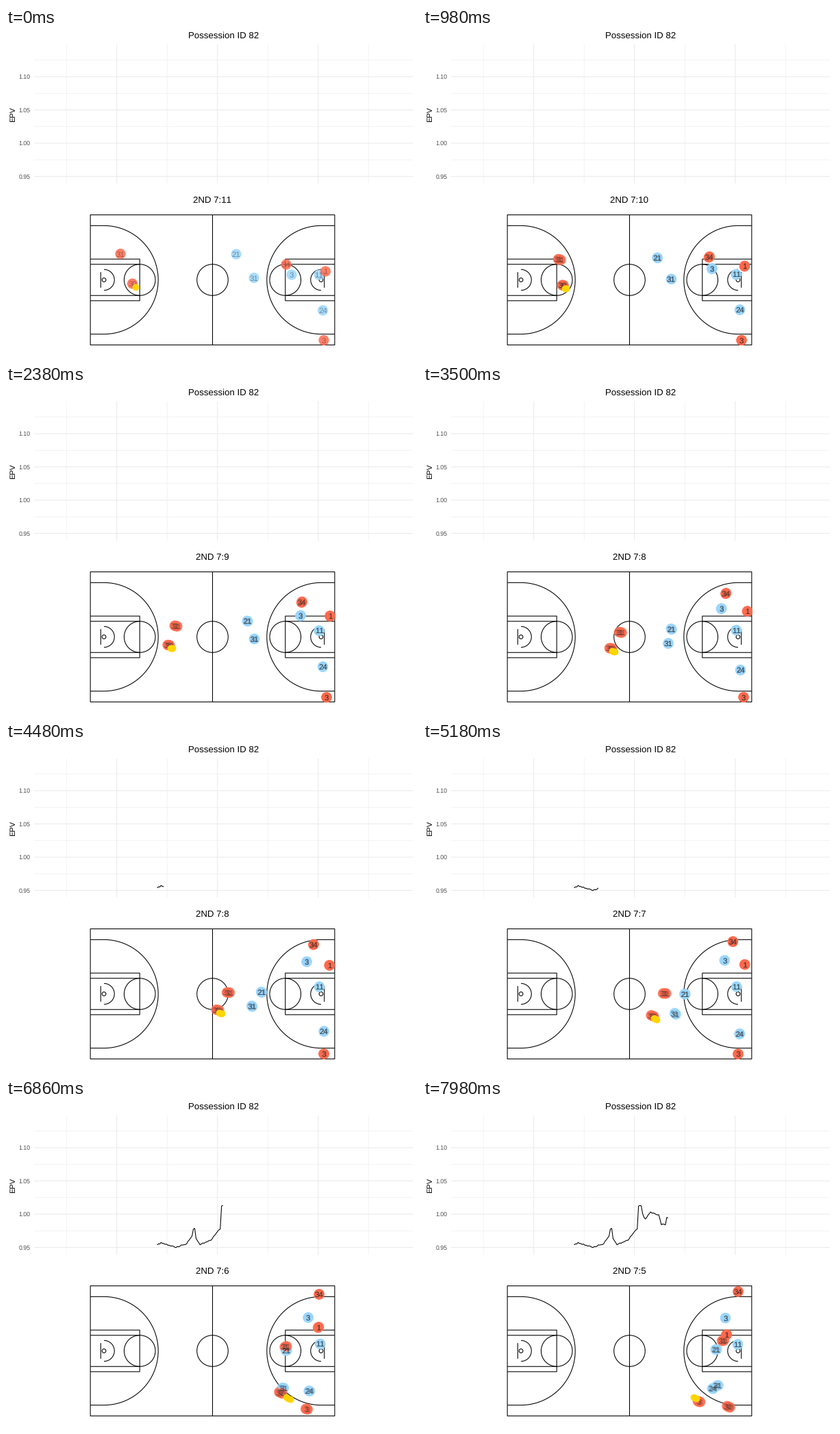
A matplotlib script for the animation above (8000 ms loop, 600 by 480 pixels).

```python
import numpy as np
import matplotlib.pyplot as plt
from matplotlib.animation import FuncAnimation

plt.rcParams.update({
    "font.family": ["Liberation Sans", "DejaVu Sans"],
    "path.snap": False,
    "text.hinting": "none",
    "text.kerning_factor": 6,
})

W, H, DPI = 600, 480, 100
PT = 72 / DPI            # points per pixel
LOOP, TICK, STEP = 8000, 40, 140
RATE = 2.605             # tracking samples per step
TRAIL = 3                # samples drawn together
EPV_START = 78           # sample at which the curve begins

fig = plt.figure(figsize=(W / DPI, H / DPI), dpi=DPI, facecolor="white")
ax = fig.add_axes([0, 0, 1, 1])
ax.set(xlim=(0, W), ylim=(H, 0))
ax.axis("off")


def line(xs, ys, color="black", width=1.07, z=2):
    return ax.plot(xs, ys, color=color, lw=width * PT, zorder=z,
                   solid_capstyle="butt", solid_joinstyle="round")[0]


def label(x, y, s, size, color="black", ha="center", **kw):
    return ax.text(x, y, s, fontsize=size * PT, color=color, ha=ha,
                   va="baseline", rotation_mode="anchor", **kw)


def smooth(u):
    u = np.clip(u, 0, 1)
    return u * u * (3 - 2 * u)


# ---- chart panel
X0, DX = 161.7, 147
Y0, DY = 216.5, 48.5

for n in range(-1, 6):
    width = 0.55 if n % 2 else 1.07
    x = X0 + n * DX / 2
    line([x, x], [24, 227], "#ebebeb", width, 1)
for n in range(8):
    width = 0.55 if n % 2 else 1.07
    y = Y0 - n * DY / 2
    line([41, 594], [y, y], "#ebebeb", width, 1)
    if n % 2 == 0:
        label(35.5, y + 3.2, f"{0.95 + n * 0.025:.2f}", 8.8, "#4d4d4d", "right")
label(317.5, 15, "Possession ID 82", 13.2)
label(13, 125.5, "EPV", 11, rotation=90)
clock = label(301.3, 255, "", 13.2)

# main turns of the curve (sample, height), with a little noise between
turns = np.array([
    (0, 212), (3, 210), (14, 216), (22, 211), (26, 200), (27, 189), (28, 189),
    (29, 204), (32, 212), (40, 206), (47, 189), (48, 155.5), (50, 155.5),
    (51, 168), (53, 175), (57, 165), (63, 169), (65, 183), (68, 183),
    (69, 172), (70, 174)])
epv_i = np.arange(turns[-1, 0] + 1)
epv_x = 220.6 + epv_i * DX / 75
epv_y = np.interp(epv_i, *turns.T)
epv_y += np.random.default_rng(4).uniform(-0.9, 0.9, len(epv_i))
epv = line([], [], z=3)

# ---- court, in feet from its centre
FT, MX, MY = 3.795, 301.5, 367.5
HOOP = 41.75


def court(xs, ys):
    """Draw on the left half and mirror to the right."""
    for side in (-1, 1):
        line(MX + side * FT * np.asarray(xs), MY + FT * np.asarray(ys))


def arc(cx, r, half=180):
    a = np.radians(np.linspace(-half, half, 90))
    return cx - r * np.cos(a), r * np.sin(a)


def bow(r):
    """Half circle around the hoop, open to the baseline."""
    x, y = arc(0, r, 90)
    return HOOP + x, y


court([0, 47, 47, 0], [-25, -25, 25, 25])
line([MX, MX], [MY - 25 * FT, MY + 25 * FT])
line(MX + FT * arc(0, 6)[0], MY + FT * arc(0, 6)[1])
bx, by = bow(20.85)
court([47, *bx, 47], [by[0], *by, by[-1]])
court([47, 28, 28, 47], [-8, -8, 8, 8])
for y in (-6, 6):
    court([47, 28], [y, y])
court(*arc(28, 6))
court(*bow(4))
court(*arc(HOOP, 0.75))
court([43, 43], [-3, 3])


# ---- players: waypoints (sample, x, y)
def route(*stops):
    """Smooth cubic path through the waypoints."""
    a = np.array(stops, float)
    t, p = a[:, 0], a[:, 1:]
    v = np.gradient(p, t, axis=0)

    def at(s):
        i = np.clip(np.searchsorted(t, s, "right") - 1, 0, len(t) - 2)
        h = t[i + 1] - t[i]
        u = (s - t[i]) / h
        w = u * u * (3 - 2 * u)
        return (p[i] * (1 - w) + p[i + 1] * w
                + h * u * (1 - u) * (v[i] * (1 - u) - v[i + 1] * u))
    return at


blue = {
    "21": route((0, 336, 330), (43, 352.5, 344.5), (82, 373, 365), (147, 428, 365.5)),
    "31": route((0, 362, 364.5), (43, 362.5, 370.5), (82, 359, 385.5),
                (126, 404.5, 421.5), (147, 430, 418)),
    "3": route((0, 417, 360), (82, 439, 320.5), (147, 441.5, 319.5)),
    "11": route((0, 457, 360), (108, 458, 357), (147, 459.5, 358)),
    "24": route((0, 462.5, 412), (43, 462.5, 411), (108, 457, 427.5), (147, 423, 422.5)),
}
red = {
    "31": route((0, 167, 329.5), (82, 324.5, 365.5), (108, 379.5, 366.5), (147, 438, 352.5)),
    "30": route((0, 184.5, 373), (43, 237.5, 379.5), (82, 309, 391), (147, 446, 449)),
    "34": route((0, 409, 345), (82, 449, 295.5), (147, 460, 281)),
    "1": route((0, 466.5, 355), (43, 473, 337), (108, 465.5, 326), (147, 443, 344)),
    "3": route((0, 464, 455.5), (82, 464, 455), (126, 439, 452.5), (147, 403, 441.5)),
}


def ball_at(s):
    """Carried by 30, then handed to 3."""
    w = smooth((s - 120) / 18)
    return (red["30"](s) + (4, 4.5)) * (1 - w) + (red["3"](s) - (6, 5.5)) * w


names = [*blue, *red]
paths = [*blue.values(), *red.values()]
colors = ["#9ad6fd"] * len(blue) + ["#ff6a4d"] * len(red)


def dots(r, z, **kw):
    return ax.scatter([], [], s=(2 * r * PT) ** 2, linewidths=0, zorder=z, **kw)


players = dots(7.6, 4, alpha=0.85)
ball = dots(4.9, 6, color="#ffd500")
tags = [[label(0, 0, n, 11.5, "#262626", alpha=0.45, zorder=5) for n in names]
        for _ in range(TRAIL)]


def head(k):
    return int(RATE * k + 0.3)


def update(i):
    k = (i * TICK + TICK // 2) // STEP
    last = head(k)
    shown = range(max(last - TRAIL + 1, 0), last + 1)

    spots = [[path(s) for path in paths] for s in shown]
    players.set_offsets(np.reshape(spots, (-1, 2)))
    players.set_facecolor(colors * len(spots))
    ball.set_offsets([ball_at(s) for s in shown])
    for j, row in enumerate(tags):
        for n, tag in enumerate(row):
            tag.set_visible(j < len(spots))
            if j < len(spots):
                x, y = spots[j][n]
                tag.set_position((x, y + 4))

    n = max(last - EPV_START + 1, 0)
    epv.set_data(epv_x[:n], epv_y[:n])
    clock.set_text(f"2ND 7:{int(11.5 - last / 25)}")
    return []


anim = FuncAnimation(fig, update, frames=LOOP // TICK, interval=TICK,
                     repeat=True, repeat_delay=0)
plt.show()
```
